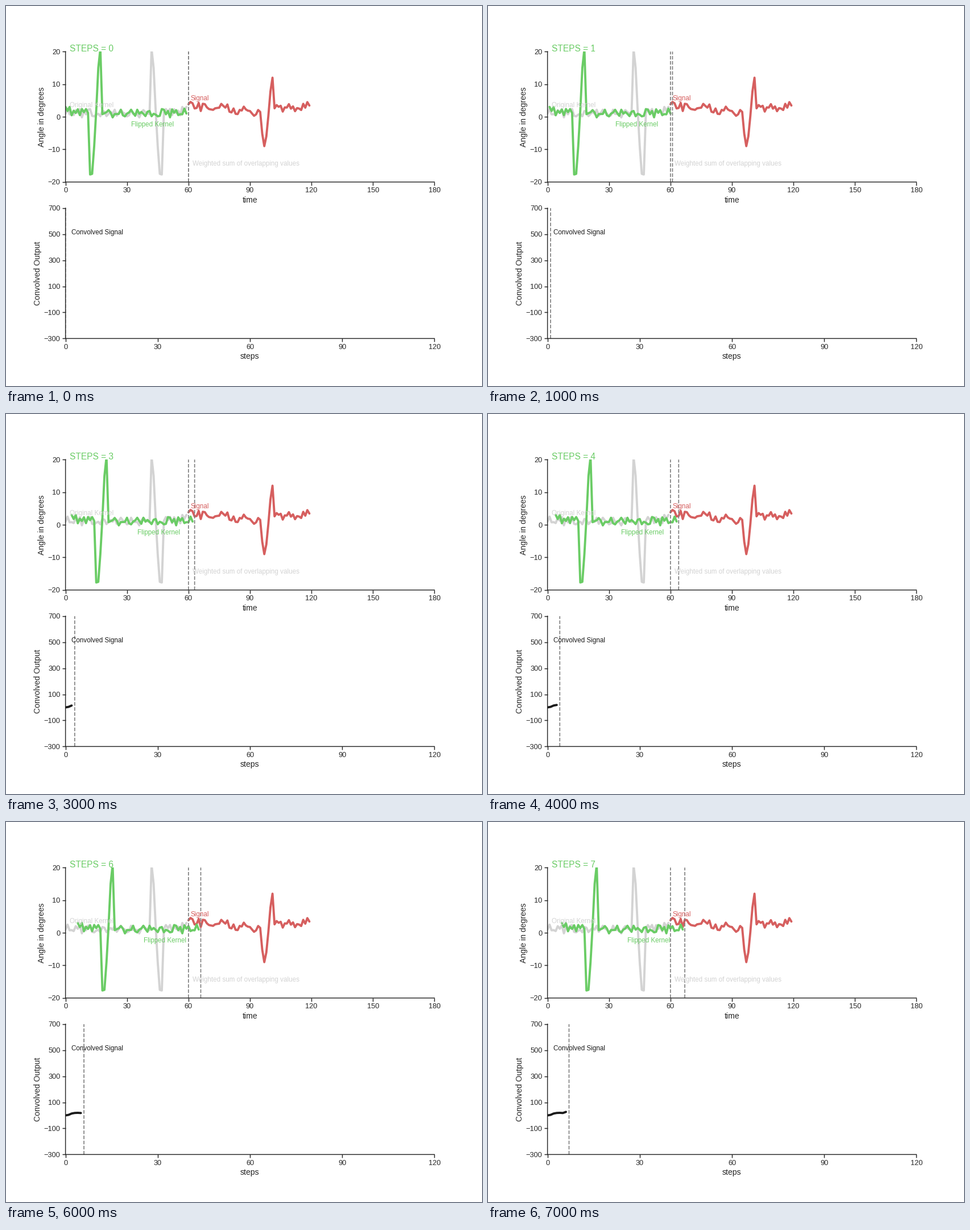
A matplotlib script that plays this animation: 837x669 px, repeating every 8000 ms.

```python
import numpy as np
import matplotlib.pyplot as plt
from matplotlib.animation import FuncAnimation

W, H = 837, 669
U = W / 864  # pixels per design point
STEPS = 8
N = 60  # samples per trace
DARK, BLACK = "0.15", "0.1"
GREEN, RED, GREY = "#6acc65", "#d65f5f", "lightgray"

plt.rcParams.update({
    "font.family": "Liberation Sans",
    "text.color": DARK,
    "axes.edgecolor": DARK,
    "axes.labelcolor": DARK,
    "axes.linewidth": 1.5 * U,
    "axes.labelsize": 14.4 * U,
    "axes.labelpad": 4 * U,
    "axes.spines.top": False,
    "axes.spines.right": False,
    "lines.solid_capstyle": "round",
})
for axis in ("xtick", "ytick"):
    plt.rcParams.update({
        f"{axis}.color": DARK,
        f"{axis}.labelsize": 13.2 * U,
        f"{axis}.major.size": 6 * U,
        f"{axis}.major.width": 1.5 * U,
        f"{axis}.major.pad": 3.5 * U,
    })


def recording(seed, start, end, onset, pulse):
    """Noisy resting angle with one sharp swing beginning at onset."""
    stop = onset + len(pulse)
    knots = [0, *range(onset, stop), N - 1]
    time = np.arange(N)
    angle = np.interp(time, knots, [start, *pulse, end])
    noise = np.random.default_rng(seed).uniform(-1.4, 1.4, N)
    resting = (time < onset) | (time >= stop)
    return angle + noise * resting


flipped = recording(4, 1.8, 1.2, 11, [1.2, -17.7, -17.5, -9, 2, 15, 20.8, 0.8])
signal = recording(7, 3.5, 3.2, 35, [1.5, -5.2, -9, -6, 0.4, 7.8, 12, 2.6])
output = np.concatenate(([0], np.convolve(flipped[::-1], signal)))
time = np.arange(N)

fig, (top, bottom) = plt.subplots(2, 1, figsize=(W / 72, H / 72), dpi=72,
                                  facecolor="white")
fig.subplots_adjust(left=0.125, right=0.9, bottom=0.125, top=0.88, hspace=0.2)


def setup(ax, xmax, ylim, ystep, xlabel, ylabel):
    ax.set(xlim=(0, xmax), ylim=ylim, xlabel=xlabel, ylabel=ylabel,
           xticks=range(0, xmax + 1, 30),
           yticks=range(ylim[0], ylim[1] + 1, ystep))
    for spine in ax.spines.values():
        spine.set_snap(False)


def curve(ax, x, y, color):
    return ax.plot(x, y, color=color, lw=4 * U)[0]


def marker(ax, x):
    return ax.axvline(x, color="gray", ls="--", lw=1.75 * U, snap=False)


def label(ax, x, y, text, color, size=12):
    return ax.text(x, y, text, color=color, fontsize=size * U)


setup(top, 3 * N, (-20, 20), 10, "time", "Angle in degrees")
setup(bottom, 2 * N, (-300, 700), 200, "steps", "Convolved Output")

curve(top, time, flipped[::-1], GREY)
curve(top, time + N, signal, RED)
kernel = curve(top, time, flipped, GREEN)
marker(top, N)
edge = marker(top, N)
result = curve(bottom, [], [], BLACK)
cursor = marker(bottom, 0)

label(top, 2, 3, "Original Kernel", GREY)
label(top, N + 1, 5, "Signal", RED)
label(top, N + 2, -15, "Weighted sum of overlapping values", GREY)
label(bottom, 2, 500, "Convolved Signal", BLACK)
name = label(top, 32, -3, "Flipped Kernel", GREEN)
counter = label(top, 2, 20, "", GREEN, 16)


def update(step):
    kernel.set_xdata(time + step)
    name.set_x(32 + step)
    counter.set_text(f"STEPS = {step}")
    edge.set_xdata([N + step] * 2)
    cursor.set_xdata([step] * 2)
    result.set_data(np.arange(step), output[:step])
    return kernel, name, counter, edge, cursor, result


anim = FuncAnimation(fig, update, frames=STEPS, interval=1000, repeat=True)
plt.show()
```
